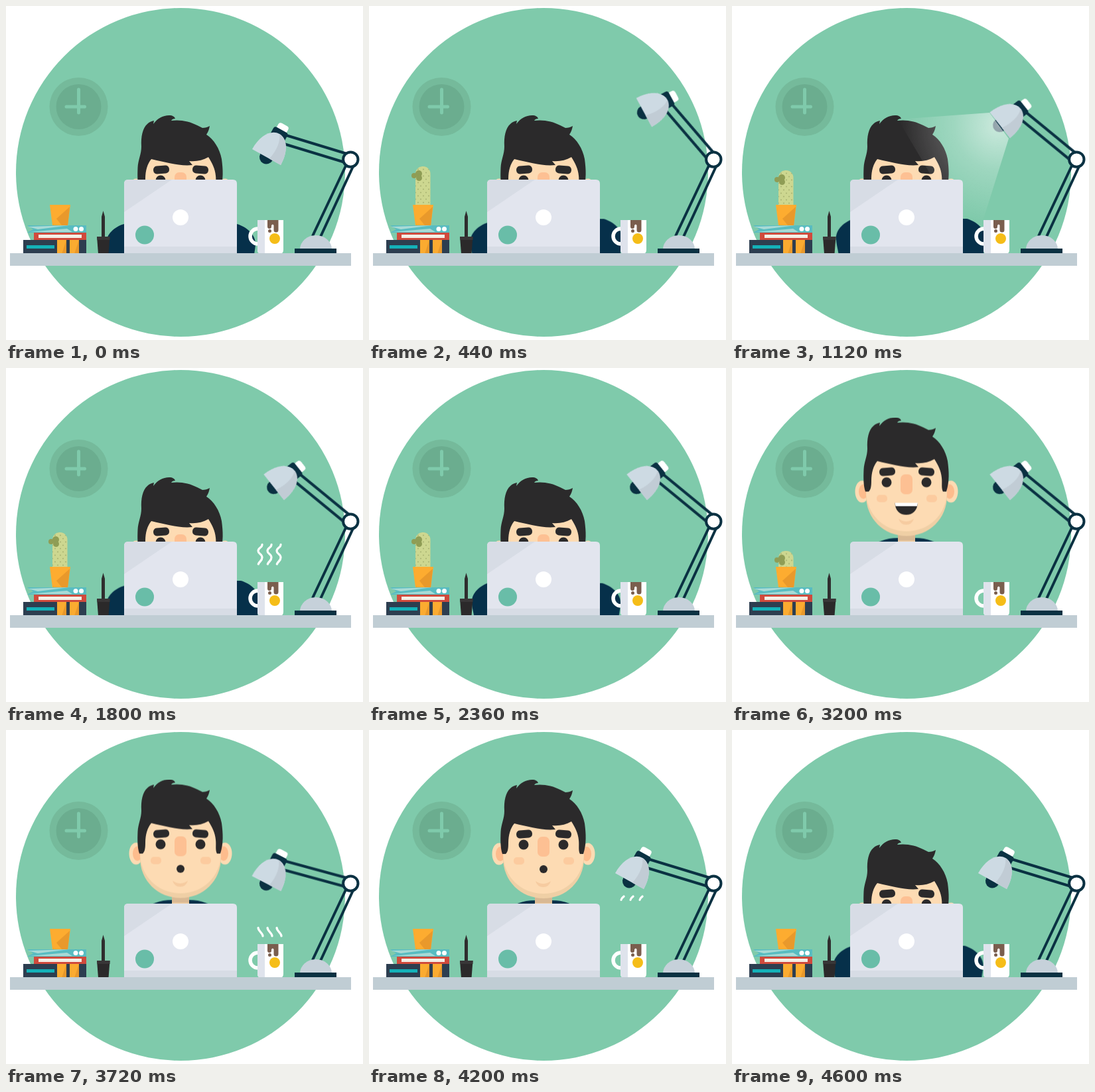
An HTML page that plays this animation: 538x504 px, repeating every 4640 ms.

```html
<!DOCTYPE html>
<html lang="en">
<head>
<meta charset="utf-8">
<title>Desk worker</title>
<style>
  html, body { margin: 0; width: 100%; height: 100%; overflow: hidden; background: #fff; }
  svg { display: block; width: 538px; height: 504px; }
  :root { --loop: 4640ms; }

  .lamp, .cactus, .head, .reach, .smile, .gasp, .light, .steam { animation: var(--loop) ease-in-out infinite; }

  .lamp { animation-name: lamp; transform-origin: 519px 232px; }
  @keyframes lamp {
    0%, 85.3%, 100% { transform: rotate(0deg); }
    2.59%, 79.9% { transform: rotate(-1.7deg); }
    9.48%, 73.7% { transform: rotate(32.5deg); }
    15.5%, 69% { transform: rotate(22.5deg); }
  }

  .cactus { animation-name: cactus; }
  @keyframes cactus {
    0%, 1.7%, 72%, 100% { transform: translateY(60px); }
    9.48%, 65.9% { transform: translateY(-6px); }
    13.8%, 62.5% { transform: none; }
  }

  .head { animation-name: head; }
  @keyframes head {
    0%, 51.3%, 99.1%, 100% { transform: translateY(96px); }
    61.6%, 88.8% { transform: translateY(-10px); }
    67.7%, 85.3% { transform: translateY(5.5px); }
    95.3% { transform: translateY(98px); }
  }

  .smile, .gasp { transform-origin: 263px 204px; }
  .smile { animation-name: smile; }
  .gasp { animation-name: gasp; }
  @keyframes smile {
    0%, 69.8%, 97%, 100% { transform: scale(1); }
    71.6%, 96% { transform: scale(0); }
  }
  @keyframes gasp {
    0%, 71.6%, 96%, 100% { transform: scale(0); }
    73.3%, 95% { transform: scale(1); }
  }

  .reach { animation-name: reach; }
  .left { --in: 34px; --beats: 23; }
  .right { --in: -34px; --beats: 27; }
  @keyframes reach {
    0%, 51.7%, 96.1%, 100% { transform: none; }
    55.2%, 92.7% { transform: translateX(var(--in)); }
  }
  .tap { animation: tap calc(var(--loop) / var(--beats)) ease-in-out infinite; }
  @keyframes tap { 50% { transform: translate(6px, -8px); } }

  .light { animation-name: light; }
  @keyframes light {
    0%, 20.7%, 34.9%, 100% { opacity: 0; }
    23.3%, 32.3% { opacity: 1; }
  }

  /* a dash window that travels up each wavy line */
  .steam { animation-name: steam; animation-timing-function: linear; }
  @keyframes steam {
    0%, 32.3% { opacity: 0; stroke-dasharray: 0 200; stroke-dashoffset: 0; }
    32.4% { opacity: 1; stroke-dasharray: 0 200; stroke-dashoffset: 0; }
    38.79% { opacity: 1; stroke-dasharray: 47 200; stroke-dashoffset: -22; }
    45.3% { opacity: 1; stroke-dasharray: 0 200; stroke-dashoffset: -100; }
    45.4%, 78.4% { opacity: 0; stroke-dasharray: 0 200; stroke-dashoffset: 0; }
    78.5% { opacity: 1; stroke-dasharray: 0 200; stroke-dashoffset: 0; }
    80.17% { opacity: 1; stroke-dasharray: 19 200; stroke-dashoffset: 0; }
    85.3% { opacity: 1; stroke-dasharray: 47 200; stroke-dashoffset: -22; }
    91.8% { opacity: 1; stroke-dasharray: 0 200; stroke-dashoffset: -100; }
    91.9%, 100% { opacity: 0; stroke-dasharray: 0 200; stroke-dashoffset: 0; }
  }
</style>
</head>
<body>
<svg viewBox="0 0 538 504">
  <defs>
    <clipPath id="abovePot"><path d="M50 200H110V301H50Z"/></clipPath>
    <clipPath id="faceShape"><path id="face" d="M202 130H324V187C324 222 297 248 263 248S202 222 202 187Z"/></clipPath>
    <pattern id="spines" width="8" height="10" patternUnits="userSpaceOnUse">
      <rect width="8" height="10" fill="#cdd790"/>
      <circle cx="2" cy="2.5" r="1.1" fill="#abb673"/>
      <circle cx="6" cy="7.5" r="1.1" fill="#abb673"/>
    </pattern>
    <radialGradient id="glow" gradientUnits="userSpaceOnUse" cx="402" cy="180" r="150">
      <stop offset="0" stop-color="#fff" stop-opacity=".6"/>
      <stop offset=".45" stop-color="#fff" stop-opacity=".25"/>
      <stop offset="1" stop-color="#fff" stop-opacity="0"/>
    </radialGradient>
    <path id="puff" pathLength="100" d="M387 311C387 306 380 304 380 298S386 292 386 286S380 281 380 276S386 271 386 267S380 262 380 257S386 252 386 247"/>
  </defs>

  <circle cx="263" cy="251" r="248" fill="#7fcaab"/>

  <!-- clock -->
  <circle cx="109.5" cy="152" r="44" fill="#75ba9b"/>
  <circle cx="109.5" cy="152" r="34" fill="#6bad8f"/>
  <path d="M109.5 126V161M91 152H118.5" stroke="#7fcaab" stroke-width="5" stroke-linecap="round"/>

  <!-- arms -->
  <g fill="#06304a">
    <g class="reach left"><path class="tap" d="M216 329H178C163 333 151 345 151 358C151 366 153 371 155 384H216Z"/></g>
    <g class="reach right"><path class="tap" d="M310 329H348C363 333 376 346 376 358C376 366 374 371 373 384H310Z"/></g>
  </g>

  <!-- person -->
  <g class="head">
    <path d="M205 268C216 257 232 251 250 251H276C294 251 310 257 321 268Z" fill="#06304a"/>
    <path d="M250 236H276V268H250Z" fill="#f0cda2"/>
    <path d="M250 236H276V255H250Z" fill="#d9b994"/>
    <g fill="#fddbb3">
      <ellipse cx="196" cy="181" rx="10.5" ry="16.5"/>
      <ellipse cx="330" cy="181" rx="10.5" ry="16.5"/>
    </g>
    <g fill="#fdbc8d">
      <ellipse cx="198" cy="181" rx="7" ry="11"/>
      <ellipse cx="328" cy="181" rx="7" ry="11"/>
    </g>
    <use href="#face" fill="#efcfa5"/>
    <path d="M202 120H324V180C324 215 297 241 263 241S202 215 202 180Z" fill="#fddbb3" clip-path="url(#faceShape)"/>
    <g fill="#fccb9f">
      <rect x="218" y="186" width="16" height="11" rx="5"/>
      <rect x="293" y="186" width="16" height="11" rx="5"/>
    </g>
    <rect x="254" y="155" width="18" height="30" rx="7" fill="#fdc093"/>
    <path d="M251 222Q262.500 230 274 222Q271 231 262.500 231T251 222Z" fill="#f6cba0"/>
    <g fill="#2b2a2b">
      <circle cx="233" cy="167" r="7.5"/>
      <circle cx="293" cy="167" r="7.5"/>
      <rect x="222" y="145" width="24" height="12" rx="5.5" transform="rotate(-5 234 151)"/>
      <rect x="281" y="145" width="24" height="12" rx="5.5" transform="rotate(5 293 151)"/>
      <path d="M201 181C198 172 198 160 198.500 148C199 136 204 128 204 116C203 101 206 88 213 82C216 79 219 78 223 77L222 82C228 74 236 69 246 69C251 69 254 71 255 74C252 74 250 75 249 77C262 75 277 78 288 84L296 88C300 88 304 87 307 85C306 91 304 95 302 98C313 105 322 119 325 135C327 150 328 166 323 181H318C315 176 317 168 316 160C315 149 311 142 305 132C296 137 287 139 276 138L281 144C262 146 241 140 219 135C213 142 210 153 210 164C210 174 209 178 206 181Z"/>
    </g>
    <g class="smile">
      <path d="M245.500 198H280C279 210 272 216 262.500 216S246 210 245.500 198Z" fill="#2b2a2b"/>
      <path d="M245.500 198H280L279 203H246.500Z" fill="#fff"/>
    </g>
    <circle class="gasp" cx="263" cy="204" r="6" fill="#2b2a2b"/>
  </g>

  <!-- lamp -->
  <path d="M514 237L462 347M524 240L474 348" stroke="#0a3142" stroke-width="4"/>
  <path d="M443 367A24 21 0 0 1 491 367Z" fill="#c6d1da"/>
  <path d="M435 366H498V374H435Z" fill="#0a3142"/>
  <g class="lamp">
    <path d="M417 193.500L517 224M414 206.500L514 237" stroke="#0a3142" stroke-width="4"/>
    <g transform="translate(392.5 228) rotate(29)">
      <circle r="10.5" fill="#0a3142"/>
      <rect x="-8.5" y="-56" width="17" height="16" rx="4" fill="#fff"/>
      <rect x="-12" y="-47" width="24" height="16" rx="4" fill="#0a3142"/>
      <path d="M-24.600 0C-24.600-25-13-40 0-40S24.600-25 24.600 0Z" fill="#cddae3"/>
      <path d="M5 0C9-16 7-32 0-40C13-40 24.600-25 24.600 0Z" fill="#c1ccd5"/>
    </g>
  </g>
  <circle cx="519.3" cy="231.6" r="11.2" fill="#fff" stroke="#0a3142" stroke-width="4"/>
  <path class="light" d="M388 161L250 171L365 366L417 200Z" fill="url(#glow)"/>

  <!-- laptop -->
  <path d="M178 374V268Q178 262 184 262H342Q348 262 348 268V374Z" fill="#e2e5ee"/>
  <path d="M178 311V268Q178 262 184 262H250Z" fill="#d7dce5"/>
  <path d="M178 363H348V374H178Z" fill="#d7dce5"/>
  <circle cx="263" cy="319" r="12" fill="#fff"/>
  <circle cx="209" cy="345.5" r="14" fill="#69bda8"/>

  <!-- books -->
  <path d="M26 353H121V374H26Z" fill="#2d3e50"/>
  <path d="M31 361H73V366H31Z" fill="#14b1b8"/>
  <path d="M77 353H91V374H77ZM96 353H110V374H96Z" fill="#fbab30"/>
  <path d="M91 353V374H84ZM110 353V374H103Z" fill="#e8982a"/>
  <path d="M42 342H121V353H42Z" fill="#d04a3c"/>
  <path d="M49 345H114V350H49Z" fill="#f5efe6"/>
  <path d="M32 331H121V342H32L41 337Z" fill="#58bcc1"/>
  <path d="M33 333L95 331L48 337ZM36 341L92 336L100 341Z" fill="#a9dad5"/>
  <g fill="#fff"><circle cx="105" cy="336.5" r="3.5"/><circle cx="113.5" cy="336.5" r="3.5"/></g>

  <!-- plant -->
  <g clip-path="url(#abovePot)">
    <g class="cactus">
      <rect x="70" y="248" width="22.5" height="100" rx="11" fill="url(#spines)"/>
      <g fill="#8f9d55">
        <circle cx="68" cy="262" r="4"/>
        <circle cx="75" cy="259" r="5"/>
        <circle cx="75.5" cy="265.5" r="4.5"/>
      </g>
    </g>
  </g>
  <path d="M66 300H97L93 331H70Z" fill="#fdac30"/>
  <path d="M96 303L76 321L84 331H93Z" fill="#e9992b"/>

  <!-- pen holder -->
  <path d="M146.500 309L149 318V349H144V318Z" fill="#2f2d2e"/>
  <path d="M137 348H156.500L154.500 374H139Z" fill="#2b292a"/>
  <path d="M137 348H156.500V353H137.500Z" fill="#383637"/>

  <!-- mug -->
  <circle cx="379.5" cy="347.5" r="11.5" fill="none" stroke="#fff" stroke-width="5.5"/>
  <path d="M379 323H418V368Q418 374 412 374H385Q379 374 379 368Z" fill="#fff"/>
  <path d="M379 323H390V374H385Q379 374 379 368Z" fill="#dfe3ec"/>
  <path d="M394 323H410.500V338A3.500 3.500 0 0 1 403.500 338V331Q402 328 400 331V333A2.700 2.700 0 0 1 394 333Z" fill="#7a5e4e"/>
  <circle cx="397.5" cy="339.5" r="2.5" fill="#7a5e4e"/>
  <circle cx="405" cy="351" r="8" fill="#f5bd18"/>
  <g class="steam" fill="none" stroke="#fff" stroke-width="3.2" stroke-linecap="round">
    <use href="#puff"/>
    <use href="#puff" x="14"/>
    <use href="#puff" x="28"/>
  </g>

  <path d="M6 373H520V392H6Z" fill="#c0cdd4"/>
</svg>
</body>
</html>
```
